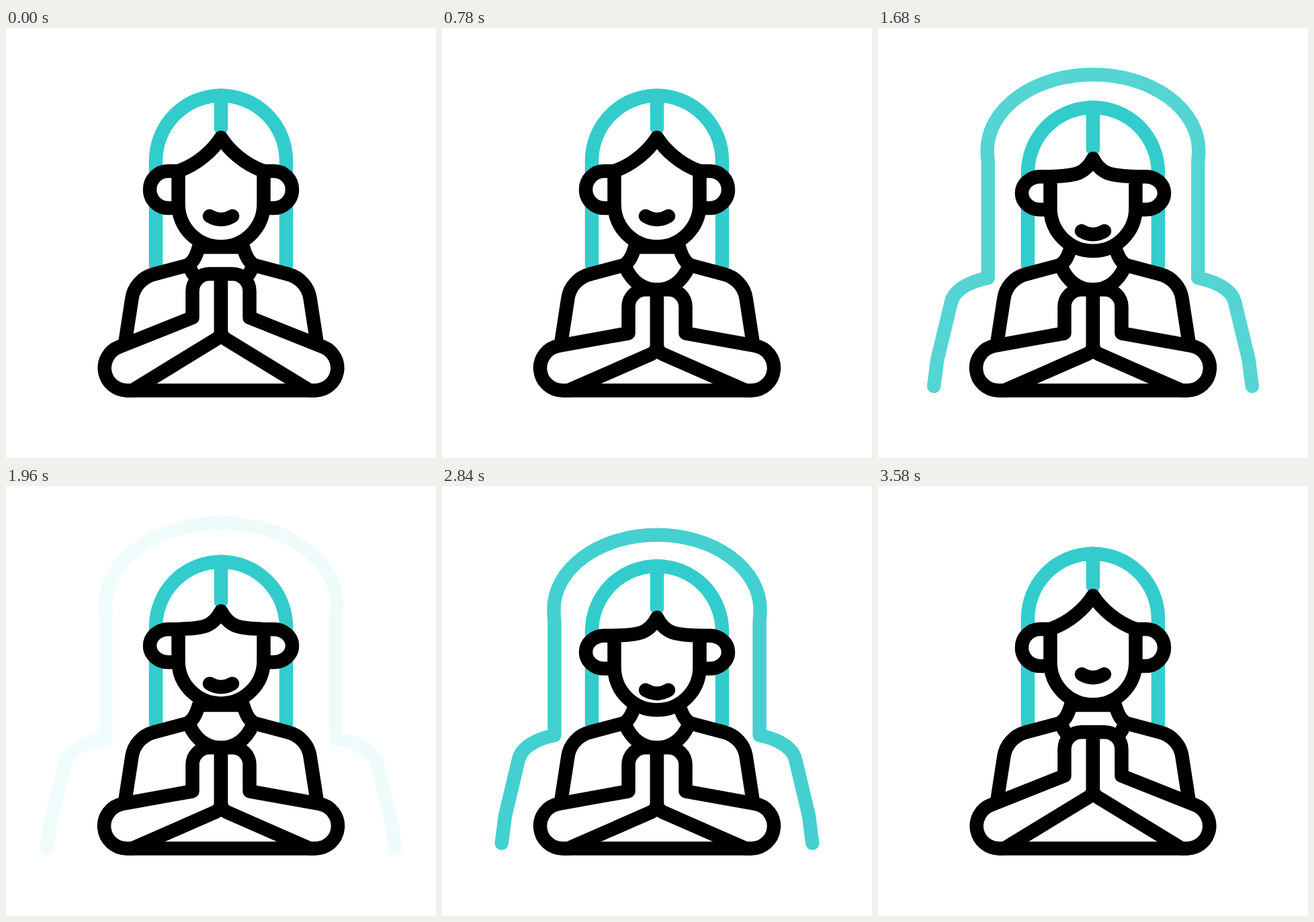
Write an HTML page that moves like this. It is 640x640 px and loops after 3.6 s.

```html
<!DOCTYPE html>
<html lang="en">
<head>
<meta charset="utf-8">
<title>Prayer</title>
<style>
  html, body { margin: 0; width: 100%; height: 100%; overflow: hidden; background: #fff; }
  svg { display: block; width: 100vw; height: 100vh; }
  path { stroke-width: 20.5; stroke-linecap: round; stroke-linejoin: round; }
  .ink { stroke: #000; fill: #fff; }
  .teal { stroke: #3cc; fill: none; }
  #hair { fill: #fff; stroke-linecap: butt; }
  .line { fill: none; }
</style>
</head>
<body>
<svg viewBox="0 0 640 640">
  <g id="glow" class="teal">
    <path id="aura"/>
    <use href="#aura" transform="translate(640) scale(-1 1)"/>
  </g>
  <g class="teal">
    <path id="hair"/>
    <path id="part"/>
  </g>
  <g class="ink">
    <path d="M177 470 L187.5 402 C190 385 203 371 220 366.5 L267 354 C278 351 283 340 287 326
             H353 C357 340 362 351 373 354 L420 366.5 C437 371 450 385 452.5 402 L463 470"/>
    <path class="line" d="M273 356 C283 378 300 389.5 320 389.5 S357 378 367 356"/>
    <path class="line" d="M180 539.5 H460"/>
    <path id="hand"/>
    <use href="#hand" transform="translate(640) scale(-1 1)"/>
    <path id="ear"/>
    <use href="#ear" transform="translate(640) scale(-1 1)"/>
    <path id="face"/>
    <path id="mouth" class="line"/>
  </g>
</svg>
<script>
const LOOP = 3600, BREATH = 1200;
const $ = id => document.getElementById(id);
const set = (id, d) => $(id).setAttribute('d', d);
const mix = (a, b, k) => a + (b - a) * k;
const ramp = (t, a, b) => Math.min(1, Math.max(0, (t - a) / (b - a)));
const ease = (t, a, b) => { const u = ramp(t, a, b); return u * u * (3 - 2 * u); };

// cubic-bezier(.3, .25, .6, 1)
function spread(u) {
  const curve = (s, a, b) => 3 * s * (1 - s) * ((1 - s) * a + s * b) + s ** 3;
  let lo = 0, hi = 1;
  for (let i = 0; i < 24; i++) {
    const s = (lo + hi) / 2;
    if (curve(s, .3, .6) < u) lo = s; else hi = s;
  }
  return curve(lo, .25, 1);
}

// [time, value] stops
function track(t, stops) {
  for (let i = 1; i < stops.length; i++) {
    const [a, v] = stops[i - 1], [b, w] = stops[i];
    if (t < b) return mix(v, w, ramp(t, a, b));
  }
  return stops[stops.length - 1][1];
}

function drawHands(k) {
  const y = 23.3 * k;
  set('hand', `M320 ${366 + y} H303 A25.5 25.5 0 0 0 277.5 ${391.5 + y} V${431 + y}
    L${mix(168, 173.8, k)} ${mix(474.8, 473, k)} A33.5 33.5 0 0 0 180 539.5 H188
    L${mix(313, 311, k)} ${mix(463, 485.5, k)}
    Q320 ${mix(458.5, 481.5, k)} 320 ${mix(451, 471, k)} Z`);
}

function drawHead(nod, bob) {
  const rise = 12 * nod + .68 * bob;
  const top = 213 + bob, jaw = 262 - 2 * nod + bob, tip = 163 + 23 * nod + bob;
  const lip = 280 + 14 * nod + bob, ear = 55 - 6 * nod;
  const x1 = 285, y1 = mix(203, 211, nod) + bob;
  const x2 = mix(308, 306, nod), y2 = mix(182, 214, nod) + bob;

  set('hair', `M223 357 V${197.5 + rise} A97 97 0 0 1 417 ${197.5 + rise} V357`);
  set('part', `M320 ${100.5 + rise} V${tip - 14}`);
  set('ear', `M256.5 ${top} H241.5 A27.5 ${ear / 2} 0 0 0 241.5 ${top + ear} H256.5`);
  set('face', `M256.5 ${top} C${x1} ${y1} ${x2} ${y2} 320 ${tip}
    C${640 - x2} ${y2} ${640 - x1} ${y1} 383.5 ${top}
    V${jaw} A63.5 63.5 0 0 1 256.5 ${jaw} Z`);
  set('mouth', `M303 ${lip} Q320 ${lip + 10} 337 ${lip}`);
}

function drawAura(t) {
  const d = 75 * spread(ramp(t, 1120, 2010));
  const x = 223.5 - d, top = 126 - .95 * d, neck = 226 - .45 * d;
  const base = 357 + .25 * d;
  const sx = 192 - 1.39 * d, sy = 389 + .32 * d;
  set('aura', `M320 ${top} A${97.5 + d} ${neck - 17 - top} 0 0 0 ${x - 1} ${neck - 17}
    Q${x - 1} ${neck - 8} ${x} ${neck} V${base}
    C${mix(x, sx, .55)} ${base + 6} ${sx + 4} ${sy - 17} ${sx} ${sy}
    L${181 - 1.55 * d} ${449 + .74 * d} L${174 - 1.52 * d} ${507 + .44 * d}`);
  $('glow').style.opacity = t < 1560
    ? track(t, [[1120, 0], [1180, .46], [1420, .87], [1560, .98]])
    : .99 * (1 - ease(t, 1560, 2040));
}

function draw(t) {
  const back = 1 - ease(t, 3200, LOOP);
  const breathing = t > 800 && t < 3200;
  const bob = breathing ? 7.5 * (1 - Math.cos((t - 800) / BREATH * 2 * Math.PI)) : 0;
  drawHands(ease(t, 0, 780) * back);
  drawHead(ease(t, 800, 1400) * back, bob);
  drawAura(t < 2200 ? t : t - BREATH);
}

function tick() {
  draw(performance.now() % LOOP);
  requestAnimationFrame(tick);
}
tick();
</script>
</body>
</html>
```
